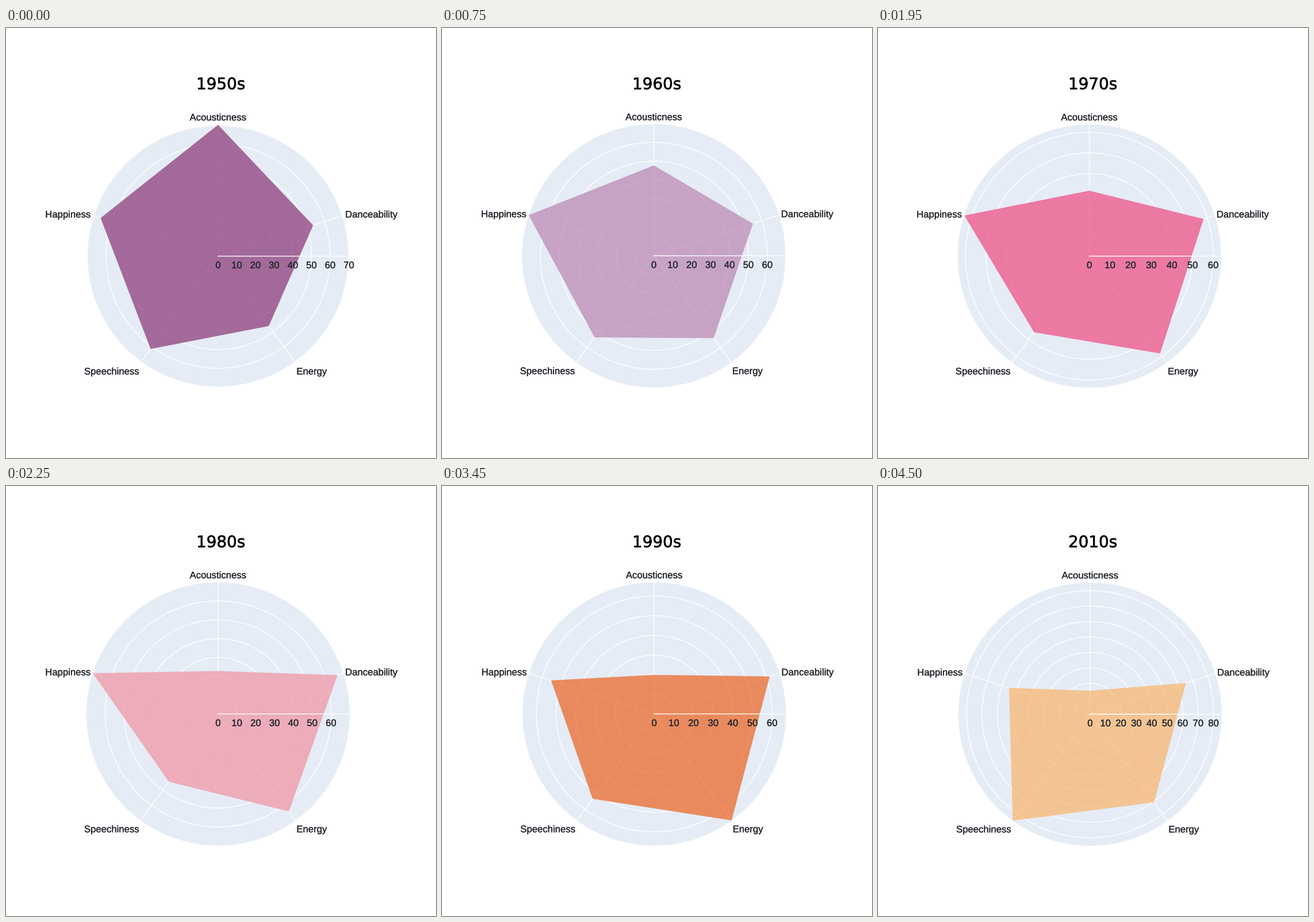
Recreate the animation shown at these times as a matplotlib script. Size 748 px wide and 748 px high, loop 5.25 s.

```python
import numpy as np
import matplotlib.pyplot as plt
from matplotlib.animation import ArtistAnimation
from matplotlib.patches import Circle, Polygon
from matplotlib.patheffects import withStroke

SIZE, DPI = 748, 88
PX = 72 / DPI  # points per pixel
INK, DISC = "#22262c", "#e5ecf6"
LINE = 1.4 * PX

plt.rcParams["font.family"] = "Liberation Sans"
plt.rcParams["text.hinting"] = "none"
plt.rcParams["path.snap"] = False

# Axis labels: text, offset from the centre, alignment
LABELS = [
    ("Acousticness", 0, -236, "center"),
    ("Danceability", 221.2, -67.2, "left"),
    ("Energy", 136.4, 205.8, "left"),
    ("Speechiness", -137, 205.8, "right"),
    ("Happiness", -221.5, -67.2, "right"),
]
ANGLES = np.radians(90 - 72 * np.arange(5))

# Decade, centre, pixels per unit, radius, colour, values in label order
DECADES = [
    ("1950s", (368.9, 396.9), 3.25, 227.5, "#873174", (70.3, 53.5, 46.2, 61.4, 66.1)),
    ("1960s", (368.5, 396.3), 3.29, 229, "#ba84b1", (47.8, 55.1, 53.8, 53.3, 69.6)),
    ("1970s", (367.7, 396.8), 3.59, 229, "#ee487f", (31.7, 58.2, 58.3, 45.6, 63.7)),
    ("1980s", (368.9, 396.5), 3.275, 229, "#f091a0", (22.8, 66.7, 64.0, 44.5, 70.0)),
    ("1990s", (369.2, 396.5), 3.417, 229, "#ec611d", (19.9, 61.8, 67.0, 53.4, 55.2)),
    ("2000s", (369.2, 396.9), 3.25, 227.5, "#f29a83", (70.3, 53.5, 46.2, 61.4, 66.1)),
    ("2010s", (368.9, 396.9), 2.685, 229, "#f9b469", (15.2, 65.3, 70.6, 85.3, 55.2)),
]

fig = plt.figure(figsize=(SIZE / DPI, SIZE / DPI), dpi=DPI, facecolor="white")
ax = fig.add_axes([0, 0, 1, 1])
ax.set(xlim=(0, SIZE), ylim=(SIZE, 0))
ax.axis("off")


def write(x, y, text, align, size=16.7, color=INK, weight=0.25, **style):
    outline = withStroke(linewidth=weight * PX, foreground=color)
    return ax.text(x, y, text, ha=align, va="baseline", fontsize=size * PX,
                   color=color, path_effects=[outline], zorder=5, **style)


def radar(title, center, unit, radius, color, values):
    cx, cy = center

    def polar(r):
        return np.column_stack([cx + r * np.cos(ANGLES), cy - r * np.sin(ANGLES)])

    ticks = np.arange(0, radius / unit + 0.01, 10)
    artists = [ax.add_patch(Circle(center, radius, fc=DISC, ec="none", zorder=1))]
    for t in ticks[1:]:
        ring = Circle(center, t * unit, fill=False, ec="white", lw=LINE, zorder=2)
        artists.append(ax.add_patch(ring))
    for x, y in polar(radius):
        artists += ax.plot([cx, x], [cy, y], color="white", lw=LINE, zorder=2)

    shape = Polygon(polar(np.array(values) * unit), fc=color, ec="none", alpha=0.7, zorder=3)
    artists.append(ax.add_patch(shape))
    artists += ax.plot([cx, cx + radius], [cy, cy], color="white", lw=LINE, zorder=4)

    for t in ticks:
        artists.append(write(cx + t * unit, cy + 21.1, f"{t:.0f}", "center"))
    for text, dx, dy, align in LABELS:
        artists.append(write(cx + dx, cy + dy, text, align))
    artists.append(write(331, 106.5, title, "left", 27.8, "black", 0.6, family="DejaVu Sans"))
    return artists


frames = [radar(*decade) for decade in DECADES]
anim = ArtistAnimation(fig, frames, interval=750, repeat=True, repeat_delay=0)
plt.show()
```
